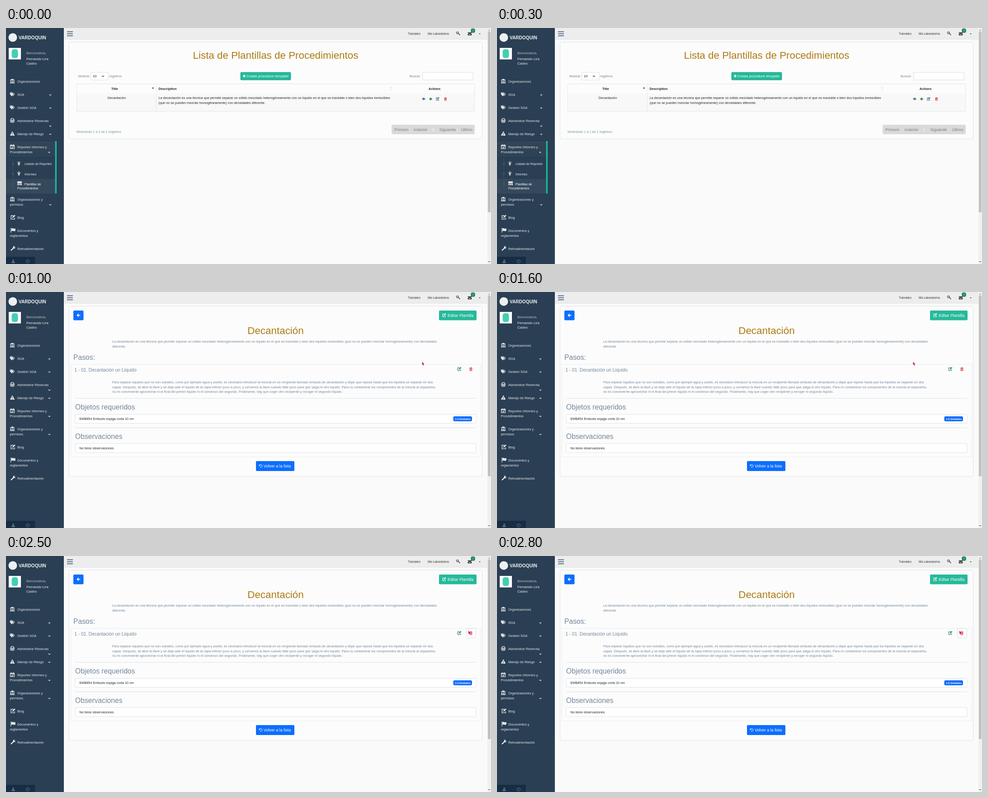
An HTML page for the animation above (3 s loop, 1073 by 522 pixels).

```html
<!DOCTYPE html>
<html lang="es">
<head>
<meta charset="utf-8">
<title>Plantillas de Procedimientos</title>
<style>
html, body { margin: 0; width: 100%; height: 100%; overflow: hidden; background: #fafafa; }
svg { display: block; }
text { font-family: "Liberation Sans", Arial, sans-serif; }
</style>
</head>
<body>
<svg id="stage" width="1073" height="522" viewBox="0 0 1073 522"></svg>
<script>
const GREY = '#73879c', DARK = '#212529', SIDE = '#2a3f54', LIGHT = '#e7e7e7', LINE = '#dee2e6';
const BLUE = '#0d6efd', TEAL = '#26b99a', GREEN = '#198754', RED = '#dc3545', GOLD = '#ad7b12';

// Icons are centred on 0,0 and about 12 units wide: [filled path, stroked path]
const icons = {
  bank: ['M0-6L6-3V-2H-6V-3ZM-5-1H-3V3H-5ZM-1-1H1V3H-1ZM3-1H5V3H3ZM-5 3.5H5V4.3H6V5.5H-6V4.3H-5Z'],
  tags: ['M-6-5H-2L3 0L-1.5 5L-6 0ZM-5-3.2A.9.9 0 1 0-3.2-3.2A.9.9 0 1 0-5-3.2ZM-.6-5H1L6 0L1.5 5L.7 4.2L4.3 0Z'],
  basket: ['M-6-1.5H6V.2H-6ZM-5.2 1H5.2L4.4 5.5H-4.4ZM-3 2V4.5H-2V2ZM-.5 2V4.5H.5V2ZM2 2V4.5H3V2Z', 'M-4-1.5L-2.5-5H2.5L4-1.5'],
  warning: ['M0-6L6 5H-6ZM-.8-2L-.5 1.7H.5L.8-2ZM-.8 2.5V4H.8V2.5Z'],
  calendar: ['M-5.5-4.5H5.5V-1.5H-5.5ZM-3.5-6H-2V-4H-3.5ZM2-6H3.5V-4H2Z', 'M-5-4V5H5V-4M-2.4 1.5L-.6 3.2L2.6 0'],
  child: ['M-1.6-4.4A1.6 1.6 0 1 0 1.6-4.4A1.6 1.6 0 1 0-1.6-4.4ZM-4.8-4L-2-1.8H2L4.8-4L5.4-3L2.3-.2V6H.5V2.5H-.5V6H-2.3V-.2L-5.4-3Z'],
  panel: ['M-6-5H6V0H-6ZM-6 1H6V5H-6ZM-5 2V4H-4V2ZM-2.5 2V4H-1.5V2ZM0 2V4H1V2ZM2.5 2V4H3.5V2Z'],
  edit: ['M-2 2L-1.4-.6L4-6L6-4L.6 1.4Z', 'M1.5-4H-5V5H4V1.5'],
  flag: ['M-6-6H-4.6V6H-6ZM-4-5Q-1-6 1-4.6Q3-4 6-5V1.5Q3 3 1 1.8Q-1 1-4 2.2Z'],
  wrench: ['M-6 4L-.2-1.2Q-1-5 3-6L5-5.6L2.8-3.8L4-2.3L6-3.4Q6 1 1.6.6L-4 6Q-6 6-6 4Z'],
  user: ['M-2.8-3A2.8 3 0 1 0 2.8-3A2.8 3 0 1 0-2.8-3ZM-5.5 5.5Q-5.5.5-2 .5Q0 2 2 .5Q5.5.5 5.5 5.5Z'],
  power: ['M-.9-6H.9V0H-.9Z', 'M-2.6-4A5 5 0 1 0 2.6-4'],
  key: ['M0 0L1.2-1.2L6 3.6L5 4.6L4 3.8L3.2 4.8L2.2 3.8L3 2.8Z', 'M-5-2.5A2.8 2.8 0 1 0 .6-2.5A2.8 2.8 0 1 0-5-2.5'],
  mail: ['M-6-4.5H6V-3L0 1.5L-6-3ZM-6-1.5L0 3L6-1.5V4.5H-6Z'],
  eye: ['M-6 0Q0-8 6 0Q0 8-6 0ZM-4.4 0Q0 6 4.4 0Q3-2 2-2.4A2.5 2.5 0 1 1-2-2.4Q-3-2-4.4 0Z'],
  plus: ['M-1.5-5.5H1.5V-1.5H5.5V1.5H1.5V5.5H-1.5V1.5H-5.5V-1.5H-1.5Z'],
  trash: ['M-5-4.5H-2L-1.4-6H1.4L2-4.5H5V-3H-5ZM-4.2-2.4H4.2V6H-4.2ZM-2.4-1V4.5H-1.4V-1ZM-.5-1V4.5H.5V-1ZM1.4-1V4.5H2.4V-1Z'],
  back: ['M-6 0L0-6L1.5-4.5L-1.6-1.3H6V1.3H-1.6L1.5 4.5L0 6Z'],
  undo: ['M-6-5.5V-.5H-1Z', 'M-4-2.5A4.6 4.6 0 1 1-3 3.4']
};

const icon = (name, x, y, size = 12, color = LIGHT) => {
  const [solid, line] = icons[name];
  return `<g transform="translate(${x} ${y}) scale(${size / 12})"><path d="${solid}" fill="${color}" fill-rule="evenodd"/>` +
    (line ? `<path d="${line}" fill="none" stroke="${color}" stroke-width="1.5"/>` : '') + '</g>';
};
const text = (x, y, str, color = GREY, size = 7.28, more = '') =>
  `<text x="${x}" y="${y}" fill="${color}" font-size="${size}" ${more}>${str}</text>`;
const rect = (x, y, w, h, fill, more = '') =>
  `<rect x="${x}" y="${y}" width="${w}" height="${h}" fill="${fill}" ${more}/>`;
const box = (x, y, w, h, fill, stroke, r = 2.2) =>
  rect(x, y, w, h, fill, `stroke="${stroke}" stroke-width=".8" rx="${r}"`);
const line = (d, color = LINE, width = .8) =>
  `<path d="${d}" fill="none" stroke="${color}" stroke-width="${width}"/>`;
const chevron = (x, y, color = LIGHT, r = 2) =>
  line(`M${x - r} ${y - r / 2}l${r} ${r}l${r} ${-r}`, color, 1.2);
const cursor = (x, y) =>
  `<path transform="translate(${x} ${y})" d="M0 0V7L1.7 5.6L3 8.4L4.3 7.8L3 5.1H5.2Z" fill="#d81f48"/>`;
const group = (id, content) => `<g id="${id}">${content}</g>`;
const BOLD = 'font-weight="bold"', MID = 'text-anchor="middle"';

function menuItem(name, y, label, rest, arrow) {
  return icon(name, name == 'edit' || name == 'flag' || name == 'wrench' ? 15.5 : 14, y - .5, 10.5) +
    text(25, y + 3, label, LIGHT) +
    (rest ? text(8.5, y + 13.8, rest, LIGHT) : '') +
    (arrow ? chevron(arrow[0], arrow[1]) : '');
}

function menu(open) {
  const x = open ? 98 : 96, dy = open ? 0 : -76;
  let out = '';
  if (open) {
    out += rect(0, 250, 109, 36.5, 'url(#active)') + line('M0 250H109M0 286.5H109', '#23364a') +
      rect(0, 334, 109, 32, '#fff', 'opacity=".05"') + rect(108.7, 250, 3.3, 116, '#1abb9c') +
      line('M15.2 289V355', '#425668');
    for (const y of [300.5, 322.5, 345]) out += `<circle cx="15.2" cy="${y}" r="2.2" fill="#425668"/>`;
    out += icon('child', 28.5, 299.5, 9) + text(41, 303.4, 'Listado de Reportes', LIGHT, 6.72) +
      icon('child', 28.5, 321.8, 9) + text(41, 325.6, 'Informes', LIGHT, 6.72) +
      icon('panel', 30, 343.3, 10) + text(41, 347.6, 'Plantillas de', '#fff', 6.72) +
      text(25, 357.4, 'Procedimientos', '#fff', 6.72);
  }
  return out +
    menuItem('bank', 118, 'Organizaciones') +
    menuItem('tags', 147, 'SGA', '', [x, 148]) +
    menuItem('tags', 176, 'Gestión SGA', '', [x, 177]) +
    menuItem('basket', 205, 'Administrar Reservas', '', [x, 217]) +
    menuItem('warning', 234, 'Manejo de Riesgo', '', [x, 235]) +
    menuItem('calendar', 263, 'Reportes Informes y', 'Procedimientos', [open ? 95.5 : 96, 275]) +
    menuItem('bank', 379 + dy, 'Organizaciones y', 'permisos', [x, 391 + dy]) +
    menuItem('edit', 419 + dy, 'Blog') +
    menuItem('flag', 448 + dy, 'Documentos y', 'reglamentos') +
    menuItem('wrench', 488 + dy, 'Retroalimentación');
}

const frame =
  `<defs><linearGradient id="active" x2="0" y2="1"><stop stop-color="#334556"/><stop offset="1" stop-color="#2c4257"/></linearGradient></defs>` +
  rect(0, 0, 1073, 522, '#fafafa') + rect(128, 0, 937, 25, '#ededed') + line('M128 25H1065', '#d9dee4') +
  rect(0, 0, 128, 522, SIDE) +
  '<circle cx="15" cy="21" r="9.5" fill="#ecf0f1"/>' + text(28, 25.2, 'VARDOQUIN', '#ecf0f1', 10.08, BOLD) +
  rect(6, 44, 27, 25.5, '#fff') + rect(12.5, 47, 14, 19.5, '#45cdb5', 'rx="5"') +
  text(45, 57.5, 'Bienvenido/a,', '#bab8b8') +
  text(45, 71, 'Fernando Lira', '#ecf0f1', 7.84) + text(45, 80.6, 'Castro', '#ecf0f1', 7.84) +
  rect(0, 506, 64, 16, '#172d44') + icon('user', 16, 516, 8, '#5a738e') + icon('power', 48, 516, 8.5, '#5a738e') +
  line('M135 8.2H148M135 12.7H148M135 17.2H148', '#5a738e', 2) +
  text(889, 15.4, 'Tutoriales', '#333', 6.4) + text(933, 15.4, 'Mis Laboratorios', '#333', 6.4) +
  icon('key', 1000.5, 12.5, 9, '#333') + icon('mail', 1026, 13, 8.5, '#333') +
  rect(1028.5, 1.3, 9.2, 9.2, GREEN, 'rx="3"') + text(1033.1, 7.8, '0', '#d8eee2', 5.2, MID) +
  '<path d="M1046 12h4l-2 2z" fill="#333"/>' +
  rect(1065, 0, 8, 522, '#f1f1f1') + rect(1066, 7.5, 6, 400, '#c1c1c1', 'id="thumb"') +
  '<path d="M1067 5.5h4l-2-2.5z" fill="#888"/><path d="M1067 516h4l-2 2.5z" fill="#505050"/>';

const list = menu(true) +
  box(139.5, 31.5, 914, 213.5, '#fcfcfc', '#d8dce0', 3) +
  text(596.5, 68, 'Lista de Plantillas de Procedimientos', GOLD, 22.4, MID) +
  text(160, 109, 'Mostrar') + box(187.5, 98, 38.5, 17, '#fff', '#ced4da') +
  text(192, 109.3, '10', DARK, 7.84) + chevron(214.5, 106.5, '#343a40', 2.4) + text(228, 109, 'registros') +
  box(519, 98, 111, 17, TEAL, '#169f85', 1.8) + icon('plus', 527, 106.3, 7, '#fff') +
  text(532, 109.2, 'Create procedure template', '#fff', 7.84) +
  text(893, 109, 'Buscar:') + box(922, 98, 111, 17, '#fff', '#ced4da', 0) +
  rect(156.5, 145, 880, 39.5, '#f8f8f8') +
  line('M156.5 123.5H1036.5V184.5H156.5ZM332.5 123.5V184.5') +
  text(240.3, 136.6, 'Title', DARK, 7.28, BOLD + MID.padStart(MID.length + 1)) +
  text(337.5, 136.6, 'Description', DARK, 7.28, BOLD) +
  text(948, 136.6, 'Actions', DARK, 7.28, BOLD + ' ' + MID) +
  '<path d="M323 134h4.4l-2.2-3.4z" fill="#444"/><path d="M850.5 132.5h3.4l-1.7-2.6zM850.5 135h3.4l-1.7 2.6z" fill="#d8dade"/>' +
  text(245, 157, 'Decantación', DARK, 7.28, MID) +
  text(337.5, 157, 'La decantación es una técnica que permite separar un sólido mezclado heterogéneamente con un líquido en el que es insoluble o bien dos líquidos inmiscibles', DARK) +
  text(337.5, 167.8, '(que no se pueden mezclar homogéneamente) con densidades diferente.', DARK) +
  icon('eye', 924, 157, 8, '#33536f') + icon('plus', 939.5, 157, 7.2, '#16803c') +
  icon('edit', 955, 156.8, 7.5, '#33536f') + icon('trash', 972.3, 157, 7.2, RED) +
  text(156, 232, 'Mostrando 1 a 1 de 1 registros', '#7396a0') +
  rect(853, 214, 184, 21, '#dadada', 'rx="3.5"') +
  [[859, 'Primero'], [901, 'Anterior'], [958.5, 'Siguiente'], [1006.5, 'Último']]
    .map(([x, s]) => text(x, 227.5, s, '#73808c', 8.96)).join('') +
  text(943, 227.5, '1', '#fff', 8.96);

const detail = menu(false) +
  box(139.5, 31.5, 914, 376.5, '#fcfcfc', '#d8dce0', 3) +
  rect(149, 41, 22.5, 21.5, BLUE, 'rx="2"') + icon('back', 160.3, 51.6, 8, '#fff') +
  rect(958, 41, 83, 21.5, TEAL, 'rx="2"') + icon('edit', 969.5, 51.3, 8.5, '#fff') +
  text(977, 54.7, 'Editar Plantilla', '#fff', 8.96) +
  text(596.5, 93, 'Decantación', GOLD, 22.4, MID) +
  text(235, 112, 'La decantación es una técnica que permite separar un sólido mezclado heterogéneamente con un líquido en el que es insoluble o bien dos líquidos inmiscibles (que no se pueden mezclar homogéneamente) con densidades') +
  text(235, 122.8, 'diferente.') +
  text(149, 149.6, 'Pasos:', GREY, 15.68) +
  line('M144 160H1050V365H144Z', '#e3e6e9') +
  text(151.5, 175.6, '1 - 01. Decantación un Líquido', GREY, 10.08) +
  text(235, 201.6, 'Para separar líquidos que no son solubles, como por ejemplo agua y aceite, es necesario introducir la mezcla en un recipiente llamado embudo de decantación y dejar que repose hasta que los líquidos se separan en dos') +
  text(235, 212.5, 'capas. Después, se abre la llave y se deja salir el líquido de la capa inferior poco a poco, y cerramos la llave cuando falte poco para que salga el otro líquido. Para no contaminar los componentes de la mezcla al separarlos,') +
  text(235, 223.4, 'no es conveniente aprovechar ni el final del primer líquido ni el comienzo del segundo. Finalmente, hay que coger otro recipiente y recoger el segundo líquido.') +
  line('M153 235.3H1040M153 300.3H1040', '#d5d9dd') +
  text(153, 259.8, 'Objetos requeridos', GREY, 15.68) + box(153, 270.5, 887, 20, '#fff', '#d8dbde') +
  text(162.5, 283.2, 'EMB854 Embudo espiga corta 10 cm', DARK) +
  rect(989.5, 275, 41.5, 11, BLUE, 'rx="3"') + text(1010.5, 282.6, '1.0 Unidades', '#fff', 5.6, BOLD + ' ' + MID) +
  text(153, 324.6, 'Observaciones', GREY, 15.68) + box(153, 335.3, 887, 20, '#fff', '#d8dbde') +
  text(162.5, 348, 'No tiene observaciones', DARK) +
  rect(553, 374, 85, 22, BLUE, 'rx="2"') + icon('undo', 563.8, 384.8, 8, '#fff') +
  text(570, 388, 'Volver a la lista', '#fff', 8.96) +
  group('hover', box(1018.5, 160.5, 21, 21, '#fff', '#cfd4d9', 2)) +
  icon('edit', 1003, 170.3, 8.5, GREEN) + icon('trash', 1028.5, 170.5, 7.8, RED);

const $ = id => document.getElementById(id);
$('stage').innerHTML = frame + group('list', list) + group('detail', detail) +
  group('near', cursor(920.5, 154.5)) + group('far', cursor(1023, 165.3));

const show = (id, on) => $(id).setAttribute('display', on ? 'inline' : 'none');

function draw() {
  const t = performance.now() % 3000;
  show('list', t < 1000);
  show('detail', t >= 1000);
  show('near', t >= 500 && t < 2000);
  show('far', t >= 2000);
  show('hover', t >= 2500);
  $('thumb').setAttribute('height', t < 2000 ? 400 : 397.5);
  requestAnimationFrame(draw);
}
draw();
</script>
</body>
</html>
```
